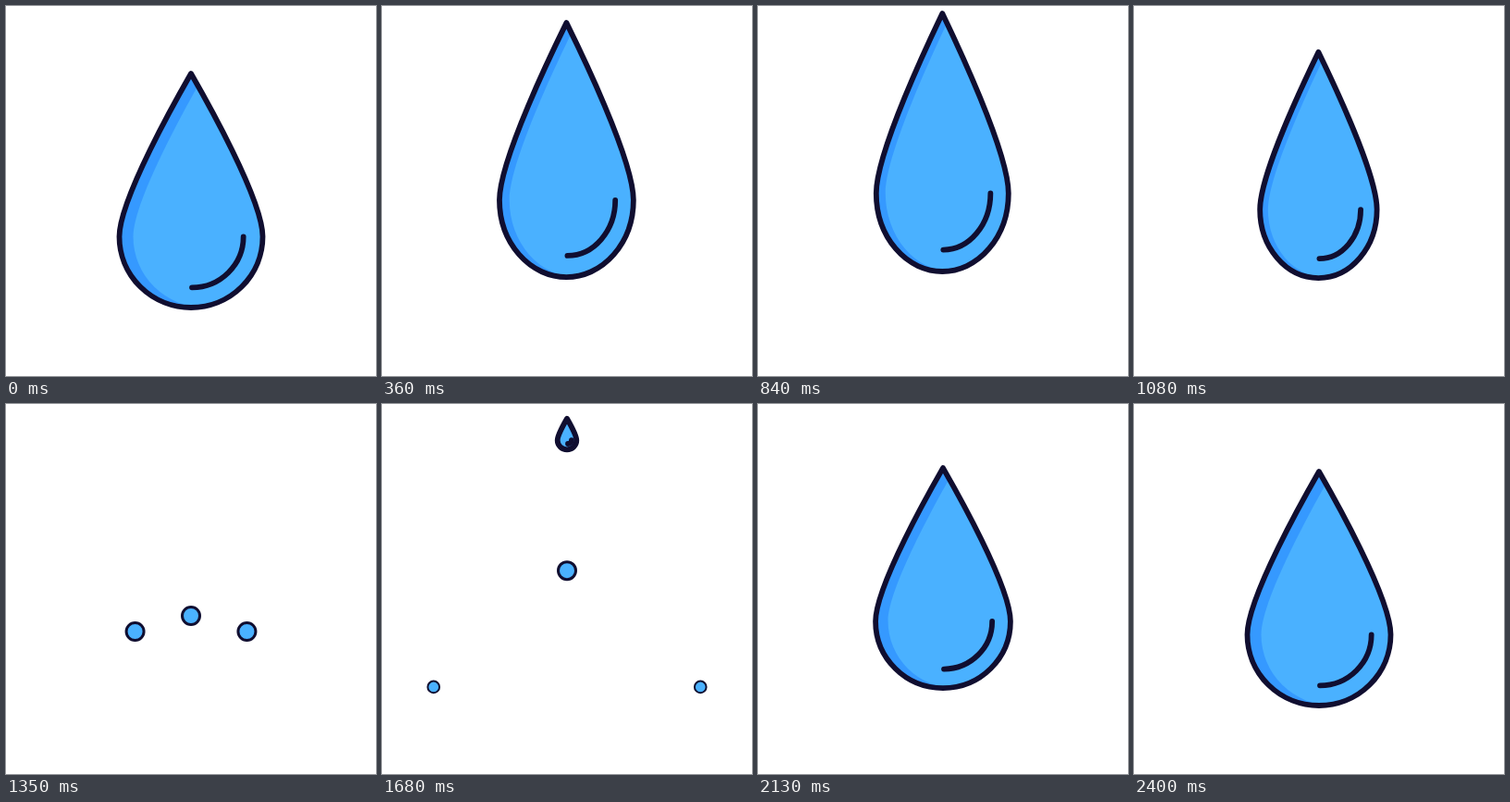
These frames come from a looping animation (400 by 400 pixels, 4.46 s). An HTML page with a canvas:

```html
<!DOCTYPE html>
<html lang="en">
<head>
<meta charset="utf-8">
<title>Water drop</title>
<style>
  html, body { margin: 0; width: 100%; height: 100%; overflow: hidden; background: #fff; }
  canvas { display: block; width: 100vw; height: 100vh; }
</style>
</head>
<body>
<canvas id="stage" width="400" height="400"></canvas>
<script>
const ctx = document.getElementById('stage').getContext('2d');
const LOOP = 4460, STEP = 30;
const INK = '#100e30', LIGHT = '#4ab1ff', SHADE = '#3599ff';

// x: centre, top, bottom, w: half width, shade: width of the dark edge
const REST  = { x: 200,   top: 73,  bottom: 326, w: 77.5, shade: 15 };
const TALL  = { x: 199.3, top: 8,   bottom: 287, w: 71.5, shade: 10 };
const POINT = { x: 200,   top: 321, bottom: 340, w: 9.5,  shade: 0 };

const clamp = v => Math.min(1, Math.max(0, v));
const phase = (t, start, length) => clamp((t - start) / length);
const easeOut = (u, n) => 1 - Math.pow(1 - u, n);
const lerp = (a, b, u) => a + (b - a) * u;

function mix(a, b, u) {
  const d = {};
  for (const key in a) d[key] = lerp(a[key], b[key], u);
  return d;
}

const waist = d => lerp(d.top, d.bottom, 0.697);
const inset = r => Math.max(0, r * 0.77 - 4);

function dropPath(d, dx = 0) {
  const h = d.bottom - d.top, mid = waist(d), x = d.x + dx;
  const y1 = d.top + h * 0.1, y2 = d.top + h * 0.537;
  const p = new Path2D();
  p.moveTo(x, d.top);
  p.bezierCurveTo(x + d.w * 0.187, y1, x + d.w, y2, x + d.w, mid);
  p.ellipse(x, mid, d.w, d.bottom - mid, 0, 0, Math.PI);
  p.bezierCurveTo(x - d.w, y2, x - d.w * 0.187, y1, x, d.top);
  p.closePath();
  return p;
}

function drawDrop(d) {
  const outline = dropPath(d), mid = waist(d);
  ctx.fillStyle = SHADE;
  ctx.fill(outline);
  ctx.save();
  ctx.clip(outline);
  ctx.fillStyle = LIGHT;
  ctx.fill(dropPath(d, d.shade));
  ctx.restore();

  ctx.strokeStyle = INK;
  ctx.lineWidth = 5.8;
  ctx.lineJoin = ctx.lineCap = 'round';
  ctx.stroke(outline);
  ctx.beginPath();
  ctx.ellipse(d.x + 1, mid, inset(d.w), inset(d.bottom - mid), 0, 0, Math.PI / 2);
  ctx.stroke();
}

function drawBall(x, y, size) {
  if (size <= 0) return;
  ctx.beginPath();
  ctx.arc(x, y, 9.5 * size, 0, Math.PI * 2);
  ctx.fillStyle = LIGHT;
  ctx.fill();
  ctx.strokeStyle = INK;
  ctx.lineWidth = 3 * size;
  ctx.stroke();
}

function drawSplash(t) {
  const s = t - 1170;
  const dx = 168 * easeOut(phase(t, 1170, 700), 1.5);
  const sideY = 331 - 0.703 * s + 0.001282 * s * s;
  const midY = 331 - 0.7145 * s + 0.000821 * s * s;
  const sideSize = 1 - phase(t, 1620, 180);
  drawBall(200 - dx, sideY, sideSize);
  drawBall(200 + dx, sideY, sideSize);
  drawBall(200, midY, 1 - phase(t, 1750, 205));
}

function grownDrop(t) {
  const s = easeOut(phase(t, 1643, 798), 3);
  return {
    x: 200,
    top: lerp(7, REST.top, s),
    bottom: lerp(7, REST.bottom, s),
    w: REST.w * s,
    shade: REST.shade * Math.pow(s, 1.7)
  };
}

function draw(t) {
  ctx.fillStyle = '#fff';
  ctx.fillRect(0, 0, 400, 400);
  if (t < 780) drawDrop(mix(REST, TALL, easeOut(phase(t, 0, 780), 3)));
  else if (t < 1180) drawDrop(mix(TALL, POINT, Math.pow(phase(t, 780, 400), 7)));
  else if (t < 2000) drawSplash(t);
  if (t >= 2400) drawDrop(REST);
  else if (t >= 1665) drawDrop(grownDrop(t));
}

const begin = performance.now();
function tick() {
  const t = (performance.now() - begin) % LOOP;
  draw(Math.floor(t / STEP) * STEP);
  requestAnimationFrame(tick);
}
tick();
</script>
</body>
</html>
```
